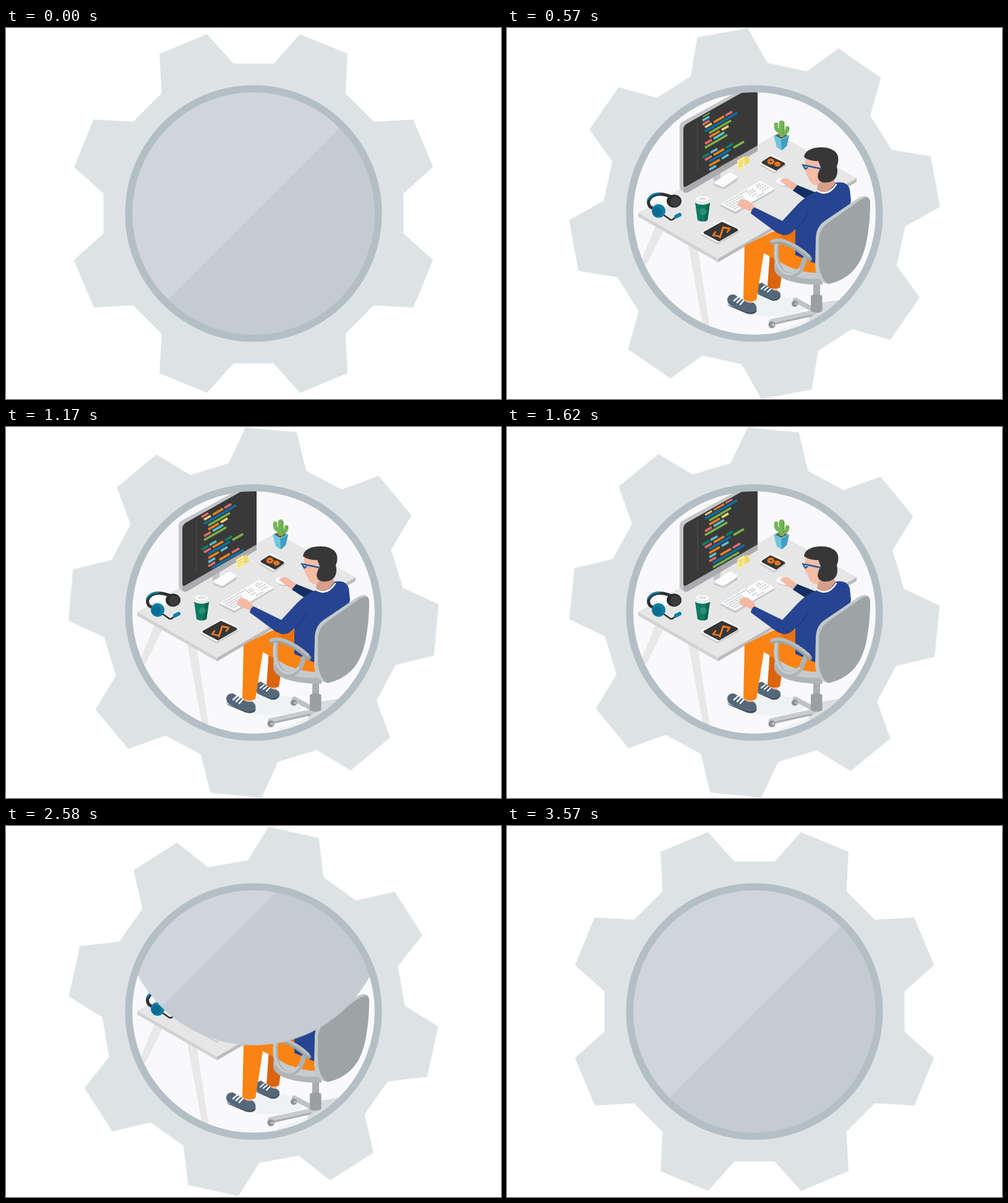
These frames come from a looping animation (800 px wide and 600 px high, 3600 ms). An HTML page:

```html
<!DOCTYPE html>
<html lang="en">
<head>
<meta charset="utf-8">
<title>Developer at work</title>
<style>
  html, body { margin: 0; width: 100%; height: 100%; overflow: hidden; background: #fff; }
  svg { display: block; width: 800px; height: 600px; }
  #gear, #lid, #code, #hand { animation: 3600ms -2ms infinite; }
  #gear { transform-origin: 400px 300px; animation-name: spin; }
  #lid { animation-name: lid; animation-timing-function: ease-in-out; }
  #code { animation-name: scroll; animation-timing-function: linear; }
  #hand { animation-name: type; animation-duration: 600ms; animation-timing-function: ease-in-out; }
  @keyframes spin {
    0% { transform: rotate(0deg); animation-timing-function: steps(119, end); }
    99.1667%, 100% { transform: rotate(360deg); }
  }
  @keyframes lid {
    0% { transform: translateY(0); }
    15%, 63.17% { transform: translateY(-420px); }
    78.17%, 100% { transform: translateY(0); }
  }
  @keyframes scroll {
    from { transform: translateY(20px); }
    to { transform: translateY(-44px); }
  }
  @keyframes type {
    0%, 10% { transform: none; }
    60% { transform: translate(2.5px, -2px); }
    100% { transform: none; }
  }
  .ln { fill: none; stroke-linecap: round; stroke-linejoin: round; }
  .soft { stroke-linejoin: round; stroke-width: 4; }
</style>
</head>
<body>
<svg viewBox="0 0 800 600">
  <defs>
    <clipPath id="hole"><circle cx="400" cy="300" r="197"/></clipPath>
    <clipPath id="screen"><path d="M310 146.5L405 91.5V189L310 244Z"/></clipPath>
    <pattern id="grain" width="60" height="7" patternUnits="userSpaceOnUse" patternTransform="rotate(-30)">
      <path d="M0 1.5H38M22 5H60" stroke="#e1e1e2" stroke-width=".8"/>
    </pattern>
  </defs>

  <path id="gear" fill="#dde3e5"/>

  <g clip-path="url(#hole)">
    <circle cx="400" cy="300" r="200" fill="#f9f9fc"/>

    <!-- floor shadows -->
    <ellipse cx="428" cy="450" rx="54" ry="16" fill="#eef2f3"/>
    <path d="M436 490L490 470 520 500Z" fill="#eef2f3"/>
    <path d="M488 462L510 444 540 439 525 475 488 478Z" fill="#dadde0"/>

    <!-- desk -->
    <path d="M241 318L254 325 225 384 217 376ZM292 346L308 355 328 486 317 482Z" fill="#e8e8e9"/>
    <path d="M212 299L436 171 565 243 341 373Z" fill="#e7e7e8"/>
    <path d="M212 299L436 171 565 243 341 373Z" fill="url(#grain)"/>
    <path d="M212 299L341 373V379L212 305Z" fill="#d2d2d4"/>
    <path d="M341 373L565 243V249L341 379Z" fill="#bcbcbe"/>

    <!-- monitor -->
    <path d="M333 240L345 234V250L335 252Z" fill="#c3c4c7"/>
    <path d="M335 251Q332 254 337 256L348 260Q351 261 355 258L371 248Q374 245 372 241L359 235Z" fill="#c9cacd"/>
    <path d="M335 249L358 235Q361 233 364 235L371 239Q374 241 371 243L352 256Q349 258 346 256L336 252Z" fill="#fcfcfd"/>
    <path d="M279 160Q279 155 283 152L400 88 405 88V199L294 265Q290 268 286 266L281 262Q279 261 279 257Z" fill="#c4c5c8"/>
    <path d="M285 258L405 190V199L294 265Q288 268 285 264Z" fill="#aaabae"/>
    <path d="M285 165Q285 158 291 154.500L400 93 405 92V190L290 256Q285 259 285 253Z" fill="#393939"/>
    <path d="M308 151V235" stroke="#5d5d5d" stroke-dasharray="2 1"/>
    <g clip-path="url(#screen)"><g id="code"></g></g>

    <!-- sticky notes -->
    <path d="M383 210L389 206 393 217 384 223Z" fill="#eed86c"/>
    <path d="M372 214L384 207V224L373 231Z" fill="#fbeb93"/>
    <path d="M375 217l6-3.500M375 221l7-4M375 225l5-3" stroke="#cdb94f"/>

    <!-- cactus -->
    <path d="M431 174L443 168 456 174 452 191 444 198 436 193Z" fill="#6fc6de"/>
    <path d="M443 181L456 174 452 191 444 198Z" fill="#3f9fc1"/>
    <path d="M434 174L443 169.500 453 174 443 179Z" fill="#71503f"/>
    <g class="ln" stroke="#75b457">
      <path d="M444 154V172" stroke-width="9"/>
      <path d="M435 156V161Q436 166 442 167M453 162V165Q451 170 446 171" stroke-width="6.500"/>
    </g>
    <path class="ln" d="M447 154V172M455 162V166" stroke="#579744" stroke-width="2" stroke-dasharray="1 4"/>

    <!-- phone -->
    <g class="soft">
      <path d="M411 221L428 209 449 221 432 233Z" fill="#c5c6c9" stroke="#c5c6c9"/>
      <path d="M411 218.500L428 206.500 449 218.500 432 230.500Z" fill="#fff" stroke="#fff"/>
      <path d="M413.500 217.500L426 209.500 447.500 219.500 435 228.500Z" fill="#363636" stroke="#363636"/>
    </g>
    <g fill="none" stroke="#f47b20">
      <g stroke-width="3"><ellipse cx="426.500" cy="216" rx="3.500" ry="2.700"/><ellipse cx="437" cy="220" rx="2.600" ry="2"/></g>
      <g stroke-width="1.500" stroke-dasharray="2 1.800"><ellipse cx="426.500" cy="216" rx="5.600" ry="4.600"/><ellipse cx="437" cy="220" rx="4.500" ry="3.600"/></g>
    </g>

    <!-- keyboard and mouse -->
    <path d="M345 285L369 297 433 260V263L369 301 345 288Z" fill="#c6c8cb"/>
    <path d="M345 285L409 247 433 260 369 297Z" fill="#fcfcfd"/>
    <g fill="none" stroke="#cfd2d6" stroke-width="2.200" stroke-dasharray="3.600 .8">
      <path d="M351 284.500L389 262M355 287L381 271.500M359 289L383 274.500M363 291L385 278M367 293L387 281"/>
      <path d="M388 266.500L398 260.500M391 269L402 262.500M396 272L404 267.500M403 255L409 251.500M404 258L414 252.500M408 260.500L419 254.500M412 263.500L424 257M404 273L416 266.500"/>
    </g>
    <path d="M435 249Q437 242 445 243L456 249Q459 254 452 257Q445 258 436 252Z" fill="#cacbce"/>
    <path d="M435 248Q438 241 446 243L456 248Q458 252 452 255Q445 256 436 251Z" fill="#fff"/>

    <!-- tablet -->
    <g class="soft">
      <path d="M316 334.500L349 315.500 374 329 340 348Z" fill="#cbccce" stroke="#cbccce"/>
      <path d="M316 331.500L349 312.500 374 326 340 345Z" fill="#fff" stroke="#fff"/>
      <path d="M319.500 331L347.500 315.500 371.500 326.500 342.500 343Z" fill="#363636" stroke="#363636"/>
    </g>
    <path class="ln" d="M337 330L333 335 343 337M349.500 322L344 339M351 323L360 324.500 356 330" stroke="#f47b20" stroke-width="2.800"/>

    <!-- cup -->
    <path d="M304 282H328L324 311Q316 315 308 311Z" fill="#0e7a60"/>
    <path d="M322 283H328L324 311 319 313Z" fill="#096650"/>
    <circle cx="317" cy="297" r="5.500" fill="#2b8f76"/>
    <path d="M303.500 281L306 275H326L328.500 281Q328 285 316 286Q304 285 303.500 281Z" fill="#e8e9eb"/>
    <ellipse cx="316" cy="276" rx="10.500" ry="3.800" fill="#fff"/>
    <ellipse cx="316" cy="276" rx="7" ry="2" fill="#dedfe2"/>

    <!-- headset -->
    <path d="M238 277Q244 273 258 275L263 287 250 290Z" fill="#fff"/>
    <g class="ln">
      <path d="M237 292Q227 289 229 279Q234 267 252 269Q265 271 272 278" stroke="#303032" stroke-width="5"/>
      <path d="M228 277Q234 267 246 267.500" stroke="#0e7fa4" stroke-width="3"/>
      <path d="M254 303L264 310Q267 311 270 308L276 304" stroke="#303032" stroke-width="2.500"/>
      <path d="M273 305L279 302" stroke="#0e7fa4" stroke-width="6"/>
    </g>
    <ellipse cx="270" cy="280" rx="12" ry="10.500" fill="#2b2b2d"/>
    <ellipse cx="272" cy="281" rx="8" ry="8" fill="#3c3c3e"/>
    <ellipse cx="245" cy="296" rx="11" ry="11" fill="#0e7fa4"/>
    <ellipse cx="243" cy="297" rx="7.500" ry="7.500" fill="#096c90"/>

    <!-- chair base -->
    <g class="ln">
      <path d="M466 440L494 455" stroke="#bfc2c4" stroke-width="8"/>
      <path d="M427 475L496 460" stroke="#c9cbcd" stroke-width="8"/>
      <path d="M429 479L492 465" stroke="#a9adaf" stroke-width="3"/>
    </g>
    <g fill="#8d9193"><circle cx="428" cy="480" r="5.500"/><circle cx="465" cy="446" r="5"/></g>
    <g fill="#bcc0c2"><circle cx="430" cy="480" r="2.500"/><circle cx="467" cy="446" r="2"/></g>
    <path d="M495 408H506V434H495Z" fill="#a9adaf"/>
    <path d="M491 433Q500 428 509.500 433V458Q500 463 491 458Z" fill="#9b9fa1"/>

    <!-- far leg -->
    <path d="M424 416H437V430H424Z" fill="#f1b7a1"/>
    <path d="M404 420Q404 413 412 412L425 420Q430 425 437 425Q443 427 442 435Q437 441 428 440L408 431Q403 428 404 420Z" fill="#54687a"/>
    <path d="M404 427Q405 430 410 432L428 439Q437 440 442 434Q440 442 429 441L408 432Q404 430 404 427Z" fill="#3b4c5a"/>
    <path class="ln" d="M411 422l6-5M416 424l6-5M421 427l5-5" stroke="#fff" stroke-width="2"/>
    <path d="M425 362L448 374 441 420Q431 424 421 418Z" fill="#db640e"/>

    <!-- near leg -->
    <path d="M385 436H397V449H385Z" fill="#f4bba5"/>
    <path d="M356 439Q357 430 367 431L383 440Q389 446 398 444Q405 448 403 457Q397 464 387 461L362 449Q356 446 356 439Z" fill="#54687a"/>
    <path d="M356 445Q357 448 363 450L387 460Q397 462 404 456Q402 465 388 462L362 451Q357 449 356 445Z" fill="#3b4c5a"/>
    <path class="ln" d="M367 441l8-7M372 444l7-7M377 447l6-7" stroke="#fff" stroke-width="2.500"/>

    <!-- seat -->
    <path d="M432 380Q445 374 470 380L510 395V415Q480 416 456 409Q434 402 432 390Z" fill="#b0b5b6"/>
    <path d="M432 382Q445 372 470 378L510 393V405Q480 408 455 399Q436 392 432 382Z" fill="#c7cbcc"/>

    <path d="M384 352L430 329 466 326 470 360 505 376 503 396Q480 396 455 386L415 364 403 440Q392 445 382 439Z" fill="#fb8313"/>
    <path d="M440 337L466 327 468 354Z" fill="#e8720f"/>

    <!-- upper body -->
    <path d="M441 247Q446 241 455 244L469 254 463 263 452 256Z" fill="#f4b9a3"/>
    <path d="M469 254L504 268 490 281 462 263Z" fill="#12305f"/>
    <path d="M503 245L528 244 532 256 516 270 501 263Z" fill="#d69f8b"/>
    <g id="hand">
      <path d="M373 285Q374 279 381 277Q389 276 400 289L395 297 382 292Q375 290 373 285Z" fill="#f4b9a3"/>
    </g>
    <path d="M400 290L445 312 470 285Q485 270 501 264Q517 273 531 250Q550 247 554 261L556 280 520 390 466 367V325Q457 336 446 335L436 331 394 300Q395 293 400 290Z" fill="#264491"/>
    <path d="M466 325Q480 314 487 299" class="ln" stroke="#1d387d" stroke-width="1.500"/>
    <path class="ln" d="M501 263Q518 274 532 253" stroke="#fff" stroke-width="2.500"/>

    <!-- head -->
    <path d="M482 209L508 209 512 242 504 252Q496 258 489 247L481 230Z" fill="#f5bca6"/>
    <path d="M480 209Q481 198 497 194Q523 190 533 203Q538 211 533 224Q535 232 533 238Q530 249 515 250Q506 250 503 244Q501 239 504 232L507 225 503 215Q490 216 480 209Z" fill="#373737"/>
    <path class="ln" d="M478 221L482 228 485 226M481 222L507 227.500" stroke="#1c5f9f" stroke-width="2.500"/>

    <!-- chair arm and back -->
    <path class="ln" d="M436 350Q432 382 446 395Q461 406 473 392Q478 386 481 374" stroke="#adb2b4" stroke-width="8"/>
    <path class="ln" d="M435 350Q431 381 445 394Q460 404 472 390" stroke="#c8cbcd" stroke-width="4"/>
    <path class="ln" d="M429 346Q437 343 449 347Q472 356 489 373" stroke="#9ea4a5" stroke-width="8"/>
    <path class="ln" d="M428 345Q438 341 450 345Q473 354 488 369" stroke="#b8bdbe" stroke-width="5"/>
    <path d="M499 342Q499 321 515 311L568 275Q586 266 587 282L570 350 522 414Q499 413 498 384Z" fill="#c3c8c9"/>
    <path d="M504 342Q505 324 520 314L570 279Q586 268 587 283Q587 312 582 340Q576 376 558 394Q543 409 520 414Q508 409 504 384Z" fill="#9da4a5"/>

    <!-- lid -->
    <g id="lid">
      <circle cx="400" cy="300" r="212" fill="#d0d4dd"/>
      <path d="M551 151A212 212 0 0 1 251 451Z" fill="#c5cbd3"/>
    </g>
  </g>
  <circle cx="400" cy="300" r="201.700" fill="none" stroke="#b3bfc5" stroke-width="11.600"/>
</svg>
<script>
  // One valley edge and one tooth side, repeated eight times.
  const side = [[-32.5, -242.5], [32.5, -242.5], [75, -290], [152, -258.5]];
  const pts = [];
  for (let i = 0; i < 8; i++) {
    const c = Math.cos(i * Math.PI / 4), s = Math.sin(i * Math.PI / 4);
    for (const [x, y] of side) pts.push(`${400 + x * c - y * s} ${300 + x * s + y * c}`);
  }
  document.getElementById('gear').setAttribute('d', `M${pts.join('L')}Z`);

  const ink = { g: '#7ab54a', t: '#07866a', b: '#0d70a5', c: '#5bc4dc', r: '#ea6b70', o: '#f5821f', y: '#fbd872' };
  // Each token: colour, start x, end x.
  const rows = [
    'g316-327', 'c316-327', 'r316-327', 'y320-331 o334-351 r353-364', 'b320-372', 'g327-362',
    'o327-344 y347-358', 'r320-331 c334-351', 'g320-356', '', 't316-327 c329-340',
    'r320-331 o334-351 t354-365', 'b327-362 g366-383', 'o327-344 c347-358', 'c327-338',
    'r327-338 o345-362 r365-377', 'b333-384', 'g333-375', 'o340-356 y359-370', 'c333-350', 'r327-338 g341-362'
  ];
  const slope = 0.577;
  document.getElementById('code').innerHTML = rows.map((row, i) => row.split(' ').filter(Boolean).map(tok => {
    const [x0, x1] = tok.slice(1).split('-').map(Number);
    const y = x => 131 + i * 6.6 - (x - 320) * slope;
    return `<path d="M${x0} ${y(x0)}L${x1} ${y(x1)}" stroke="${ink[tok[0]]}" stroke-width="3.6"/>`;
  }).join('')).join('');
</script>
</body>
</html>
```
